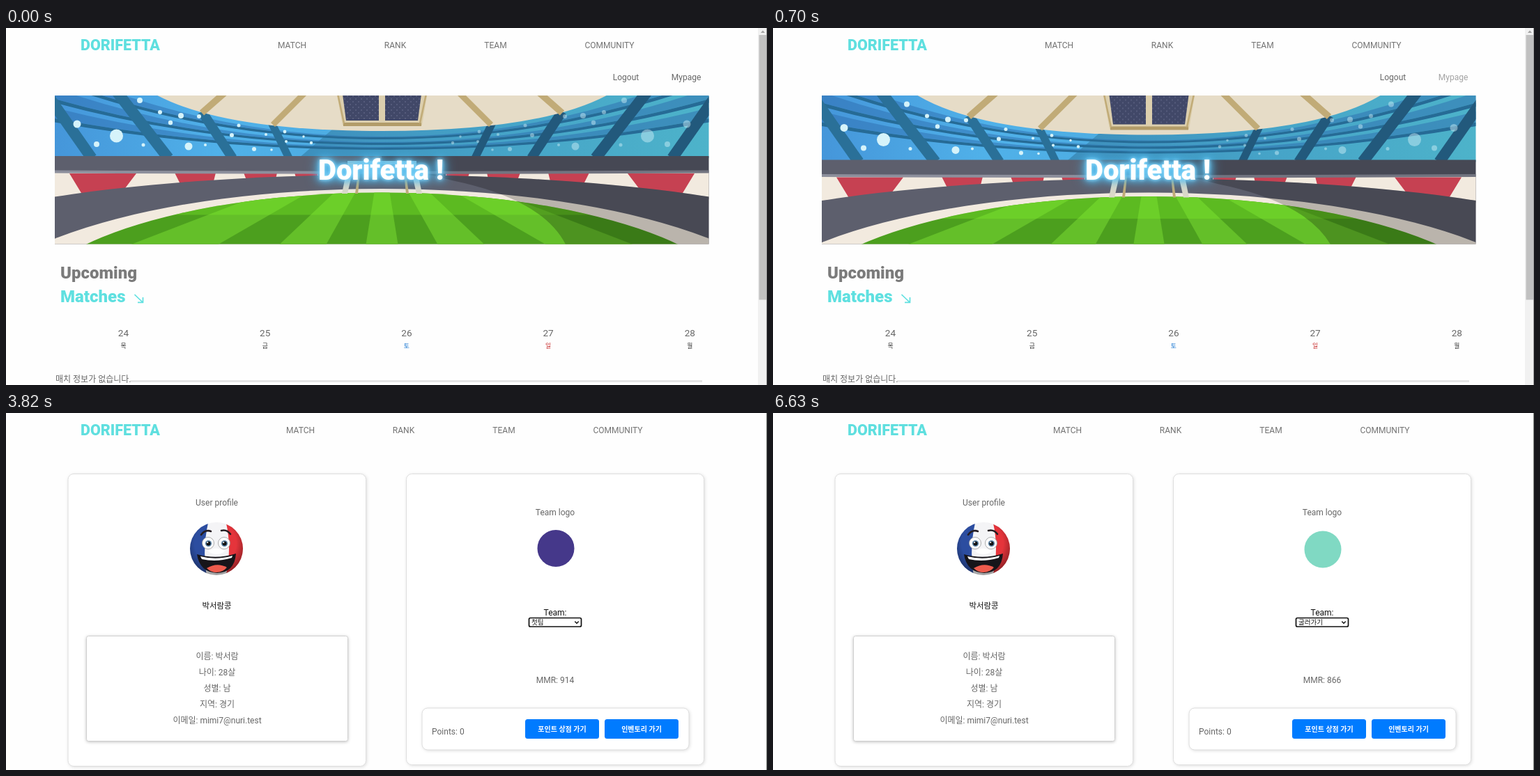
An HTML page for the animation above (8000 ms loop, 1092 by 513 pixels).

```html
<!DOCTYPE html>
<html lang="ko">
<head>
<meta charset="utf-8">
<title>Match day</title>
<style>
html, body { margin: 0; width: 100%; height: 100%; overflow: hidden; background: #fefefe; }
svg { display: block; width: 100vw; height: 100vh; }
text { font: 12px Roboto, "Noto Sans CJK KR", "Noto Sans CJK", sans-serif; fill: #666; }
.mid { text-anchor: middle; }
.brand { font-size: 21.5px; font-weight: 900; fill: #5fdfdf; }
.head { font-size: 24px; font-weight: 900; fill: #7b7b7b; }
.title { font-size: 40px; font-weight: 900; fill: #fff; filter: drop-shadow(0 0 2px #a5e5ff) drop-shadow(0 0 5px #5cc4f5) drop-shadow(0 0 8px #4ab4e8); }
.date { font-size: 13.6px; }
.day { font-size: 8.8px; }
.btn { font-size: 10px; font-weight: 700; fill: #fff; }
.opt { font: 9.5px "Liberation Sans", "Noto Sans CJK KR", "Noto Sans CJK", sans-serif; fill: #111; }
.card { fill: #fff; stroke: #dedede; filter: drop-shadow(1px 1px 2px rgba(0,0,0,.13)); }
</style>
</head>
<body>
<svg id="stage" viewBox="0 0 1092 513" xmlns="http://www.w3.org/2000/svg"></svg>
<script>
const LOOP = 8000;
const BRAND = 'Dorifetta';
const TEAMS = ['SIDE GREEN', '첫팀', '굴러가기', 'SIDE RED', 'SIDE TAN'];
const ROWS = [308, 320, 334, 348, 360.5, 373];
const LOGOS = [['#f03f2e', 193.5], ['#45388a', 194.5], ['#80d9c3', 196]];
const RATINGS = ['N/A', '914', '866'];

const text = (x, y, str, cls = '', extra = '') => `<text x="${x}" y="${y}" class="${cls}" ${extra}>${str}</text>`;
const mid = (x, y, str, cls = '', extra = '') => text(x, y, str, 'mid ' + cls, extra);
const path = (d, fill, extra = '') => `<path d="${d}" fill="${fill}" ${extra}/>`;
const line = (d, color, width, extra = '') => path(d, 'none', `stroke="${color}" stroke-width="${width}" ${extra}`);
const rect = (x, y, w, h, fill, extra = '') => `<rect x="${x}" y="${y}" width="${w}" height="${h}" fill="${fill}" ${extra}/>`;
const card = (x, y, w, h, r) => `<rect x="${x}" y="${y}" width="${w}" height="${h}" rx="${r}" class="card"/>`;
const circle = (x, y, r, fill, extra = '') => `<circle cx="${x}" cy="${y}" r="${r}" fill="${fill}" ${extra}/>`;
const ellipse = (top, a, b, fill) => `<ellipse cx="539.5" cy="${top + b}" rx="${a}" ry="${b}" fill="${fill}"/>`;
const flip = (s, extra = '') => `<g transform="matrix(-1 0 0 1 1079 0)" ${extra}>${s}</g>`;
const both = s => s + flip(s);
const gradient = (id, x1, x2, ...stops) => `<linearGradient id="${id}" gradientUnits="userSpaceOnUse" x1="${x1}" x2="${x2}" y1="0" y2="0">${
  stops.map(([o, c]) => `<stop offset="${o}" stop-color="${c}"/>`).join('')}</linearGradient>`;

const nav = dx => text(107, 32, BRAND.toUpperCase(), 'brand') +
  [['MATCH', 410.5], ['RANK', 558.5], ['TEAM', 702.5], ['COMMUNITY', 866]]
    .map(([s, x]) => mid(x + dx, 29, s, '', 'fill-opacity=".92"')).join('');

const defs = `<defs>
  ${gradient('blue', 70, 540, [0, '#4596da'], [.5, '#50b1e9'], [1, '#4cabe0'])}
  ${gradient('teal', 430, 1008, [0, '#3d8fbd'], [.5, '#46a4c8'], [1, '#4db3ca'])}
  ${gradient('wall', 0, 1079, [.5, '#5d5f6d'], [.5, '#464854'])}
  ${gradient('rail', 0, 1079, [.5, '#8d8f9c'], [.5, '#727480'])}
  <clipPath id="banner">${rect(70, 97, 938.5, 213.5, '#000')}</clipPath>
  <clipPath id="bowl">${ellipse(211, 700, 122, '#000')}</clipPath>
  <clipPath id="pitch">${ellipse(236.5, 520, 176, '#000')}</clipPath>
  <clipPath id="ball">${circle(302, 195, 38, '#000')}</clipPath>
  <radialGradient id="shade" cx=".48" cy=".4" r=".6"><stop offset=".65" stop-opacity="0"/><stop offset="1" stop-opacity=".38"/></radialGradient>
  <pattern id="lamps" width="8" height="8" patternUnits="userSpaceOnUse">${circle(2, 2, .7, '#767d9d')}${circle(6, 6, .7, '#767d9d')}</pattern>
</defs>`;

// Crescent across the stands, thick at both sides and thin in the middle.
const tier = (side, middle, dSide, dMiddle) => {
  const s = side + dSide, m = middle + dMiddle;
  return `M30 ${side}Q270 ${middle} 539.5 ${middle}Q809 ${middle} 1049 ${side}V${s}Q809 ${m} 539.5 ${m}Q270 ${m} 30 ${s}Z`;
};

function stands() {
  const tiers = [[58, 157], [90, 165], [122, 172]];
  const aisles = [[48, 80, 123, 187, 16], [150, 80, 233, 187, 16], [281, 120, 325, 187, 14], [381, 136, 406, 187, 11]];
  const dots = [[102, 138, 5.5], [158.5, 155, 9.5], [192, 104, 4], [221, 121, 3], [251, 126, 4], [277, 127, 3],
    [130, 167, 4], [197, 168, 2.5], [236, 136, 3.2], [262, 170, 5.5], [286, 168, 2], [324, 154, 3],
    [334, 140, 2.5], [356, 174, 3], [381, 175, 1.8], [373, 153, 2], [400, 149, 2.4], [402, 163, 2], [427, 156, 1.7], [438, 165, 2.2]];
  const lamps = dots.map(([x, y, r]) => circle(x, y, r, '#d5f3fa')).join('');
  return rect(60, 60, 480, 130, 'url(#blue)') +
    path('M468 60V146L420 187H1020V60Z', 'url(#teal)') +
    tiers.map(([a, b]) => path(tier(a - 18, b - 1, 18, 1), '#2e6fb0', 'opacity=".5"') +
      path(tier(a, b, 6, 3), '#266b96')).join('') +
    aisles.map(([a, b, c, d, w]) => line(`M${a} ${b}L${c} ${d}`, '#2a7098', w) +
      flip(line(`M${a} ${b}L${c} ${d}`, '#22597c', w))).join('') +
    lamps + flip(lamps, 'opacity=".45"');
}

function roof() {
  const board = 'M481 80H535V133H488Z';
  return path('M190 80H889L874 90Q780 148 539.5 148Q300 148 205 90Z', '#e6dcc7') +
    both(line('M323 85L281 122', '#c1ab77', 9.5) + line('M437 85L383 139', '#c1ab77', 8.5)) +
    path('M472 80H607L597 140H483Z', '#dccfae') + rect(484, 136, 112, 5, '#b29c69') +
    both(line('M474 85L485 137', '#c1ab77', 2.5) + path(board, '#414868') + path(board, 'url(#lamps)'));
}

function ground() {
  const reds = 'M91 209H187L162 242H111ZM242 208H301L295 232H254ZM341 208H389L385 226H348ZM414 208H448L445 221H418Z';
  const low = [23, 80, 147, 235, 360], high = [11, 38, 68, 105, 165];
  const stripe = (i, j) => `M${539.5 + high[i]} 236L${539.5 + high[j]} 236L${539.5 + low[j]} 311L${539.5 + low[i]} 311Z`;
  const mow = [[1, 2], [3, 4]].map(([i, j]) => path(stripe(i, j), '#64bf29')).join('');
  return rect(60, 184, 960, 62, 'url(#wall)') +
    both(rect(60, 208, 388, 45, '#f2eadf') + path(reds, '#c64152')) +
    line('M60 206.5Q539.5 209 1019 206.5', 'url(#rail)', 4) +
    `<g clip-path="url(#bowl)">` +
    rect(60, 200, 960, 130, '#5d5f6d') + ellipse(231, 600, 190, '#f2eadf') +
    `<g clip-path="url(#pitch)">` + rect(60, 230, 960, 100, '#4c9f1e') + both(mow) +
    path('M528.5 236H550.5L562.5 311H516.5Z', '#64bf29') +
    rect(60, 230, 960, 38.5, '#7cf02a', 'opacity=".33"') + '</g>' +
    path('M585 205L640 219Q770 246 803 311V330H1020V205Z', '#000', 'opacity=".23"') + '</g>' +
    rect(490, 191, 99, 5, '#a5cbd6') +
    both(path('M482 238H490L500 194H491Z', '#dcd9c8') + path('M501 238H505L508 208H505Z', '#c1ab77'));
}

function homePage() {
  const days = [['24', '목'], ['25', '금'], ['26', '토', '#1976d2'], ['27', '일', '#c62828'], ['28', '월']];
  return nav(0) + mid(889.5, 75, 'Logout') + mid(976, 75, 'Mypage', '', 'id="mypage"') +
    `<g clip-path="url(#banner)"><g id="scene">${stands()}${roof()}${ground()}</g></g>` +
    text(448, 218, BRAND + ' !', 'title') +
    text(78, 360, 'Upcoming', 'head') + text(78, 394, 'Matches', 'head', 'style="fill:#5fe0e0"') +
    line('M184.500 383L196 394M196.500 387V394.300H189', '#5fe0e0', 1.7) +
    days.map(([n, d, c = '#333'], i) => mid(168.5 + i * 203.2, 443, n, 'date') +
      mid(168.5 + i * 203.2, 459.5, d, 'day', `style="fill:${c}"`)).join('') +
    rect(178, 506, 821, 3, '#e4e4e4') + text(71, 508.5, '매치 정보가 없습니다.') +
    rect(1079, 0, 13, 513, '#f1f1f1') + rect(1080.5, 10, 10.5, 380.5, '#c1c1c1') +
    path('M1083 7L1086 3.500L1089 7Z', '#a3a3a3') + rect(1091, 0, 1, 513, '#999');
}

function avatar() {
  const eye = x => circle(x, 187, 8.5, '#fff', 'stroke="#999" stroke-width=".8"') +
    circle(x + .5, 187.5, 4.6, '#5b84a8') + circle(x + .5, 187.5, 3, '#111') + circle(x - .8, 186, 1.1, '#fff');
  return `<g clip-path="url(#ball)">` + rect(260, 150, 84, 90, '#f4f4f6') +
    path('M260 150H292Q280 195 289 240H260Z', '#2c4da0') + path('M314 150H345V240H314Q326 195 314 150Z', '#e5343b') +
    circle(302, 195, 38.3, 'url(#shade)') + '</g>' +
    path('M290 199Q301 190 314 199Q302 207 290 199Z', '#fff', 'opacity=".85"') +
    eye(290) + eye(313) +
    line('M280 175Q286 167 294 170M309 169Q317 167 322 174', '#251d22', 2.6, 'stroke-linecap="round"') +
    path('M274 203Q302 211 330 202Q328 229 303 230Q278 229 274 203Z', '#17151a') +
    path('M279 206Q302 212 325 205L324 208Q302 215 281 210Z', '#fff') +
    path('M288 223Q303 214 317 222Q311 229 302 229Q294 229 288 223Z', '#ee5b4d');
}

function profilePage() {
  const info = ['이름: 박서람', '나이: 28살', '성별: 남', '지역: 경기', '이메일: mimi7@nuri.test'];
  const button = (x, label) => rect(x, 440, 106, 28, '#007bff', 'rx="3.5"') + mid(x + 53, 457.5, label, 'btn');
  return nav(12) + card(89, 87.5, 427.5, 420, 8) + card(574.5, 87.5, 427, 418, 8) +
    mid(302.5, 132.5, 'User profile') + avatar() +
    mid(302.5, 281, '박서람콩', '', 'style="font-size:11.4px;font-weight:500;fill:#111"') +
    `<g style="filter:drop-shadow(0 1px 2px rgba(0,0,0,.24))">${rect(115.5, 320.5, 375, 151, '#fff', 'rx="3" stroke="#d0d0d0"')}</g>` +
    info.map((s, i) => mid(303, 354 + i * 23.1, s)).join('') +
    mid(788, 147, 'Team logo') + circle(789, 194, 26.5, '#000', 'id="logo"') +
    mid(788, 291, 'Team:', '', 'style="fill:#111"') +
    mid(788, 388, '', '', 'id="rating"') +
    card(597, 424, 383, 60, 8) + text(611, 462, 'Points: 0') +
    button(745, '포인트 상점 가기') + button(859, '인벤토리 가기') +
    rect(750.5, 294.5, 75, 12.5, '#fff', 'rx="2" id="select"') + text(754, 304.2, '', 'opt', 'id="choice"') +
    line('M816.300 299.500L819 302.200L821.700 299.500', '#111', 1.5) +
    `<g id="menu"><g style="filter:drop-shadow(1px 2px 2px rgba(0,0,0,.35))">${rect(750.5, 307.5, 75, 66, '#fff', 'stroke="#777"')}</g>` +
    rect(751, 308, 74, 12, '#1967d2', 'id="mark"') +
    TEAMS.map((s, i) => text(754, (ROWS[i] + ROWS[i + 1]) / 2 + 3.2, s, 'opt option')).join('') + '</g>' +
    rect(1091, 0, 1, 513, '#7d817d');
}

const stage = document.getElementById('stage');
stage.innerHTML = defs + `<g id="home">${homePage()}</g><g id="profile">${profilePage()}</g>`;
const $ = id => document.getElementById(id);
const ui = Object.fromEntries(['home', 'profile', 'scene', 'mypage', 'logo', 'rating', 'select', 'choice', 'menu', 'mark'].map(id => [id, $(id)]));
const options = [...document.querySelectorAll('.option')];
const show = (el, on) => el.setAttribute('display', on ? 'inline' : 'none');
const set = (el, attrs) => Object.entries(attrs).forEach(([k, v]) => el.setAttribute(k, v));

// Value of the last [time, value] step reached.
const at = (t, first, ...steps) => steps.reduce((v, [time, next]) => t >= time ? next : v, first);

function render(t) {
  const home = t < 765;
  show(ui.home, home);
  show(ui.profile, !home);
  if (home) {
    const step = Math.floor(t / 70) * 70;
    set(ui.scene, { transform: `translate(0 ${.0095 * step - 2.4e-6 * step * step})` });
    ui.mypage.style.fillOpacity = 1 - .4 * Math.min(1, Math.max(0, (step - 490) / 210));
    return;
  }
  const open = at(t, false, [2700, true], [3760, false], [5300, true], [6560, false]);
  const chosen = at(t, 0, [3760, 1], [6560, 2]);
  const loaded = at(t, 0, [3820, 1], [6630, 2]);
  const marked = at(t, 0, [3100, 1], [5640, 0], [5770, 1], [5900, 2]);
  const focused = !open && chosen > 0;

  const [color, y] = LOGOS[loaded];
  set(ui.logo, { fill: color, cy: y });
  ui.rating.textContent = 'MMR: ' + RATINGS[loaded];
  ui.choice.textContent = TEAMS[chosen];
  set(ui.select, {
    stroke: focused ? '#101010' : !open && t >= 2430 ? '#4f4f4f' : '#767676',
    'stroke-width': focused ? 1.7 : 1
  });
  show(ui.menu, open);
  set(ui.mark, { y: ROWS[marked], height: ROWS[marked + 1] - ROWS[marked] });
  options.forEach((o, i) => { o.style.fill = i === marked ? '#fff' : '#111'; });
}

const start = performance.now();
function tick() {
  render((performance.now() - start) % LOOP);
  requestAnimationFrame(tick);
}
tick();
</script>
</body>
</html>
```
